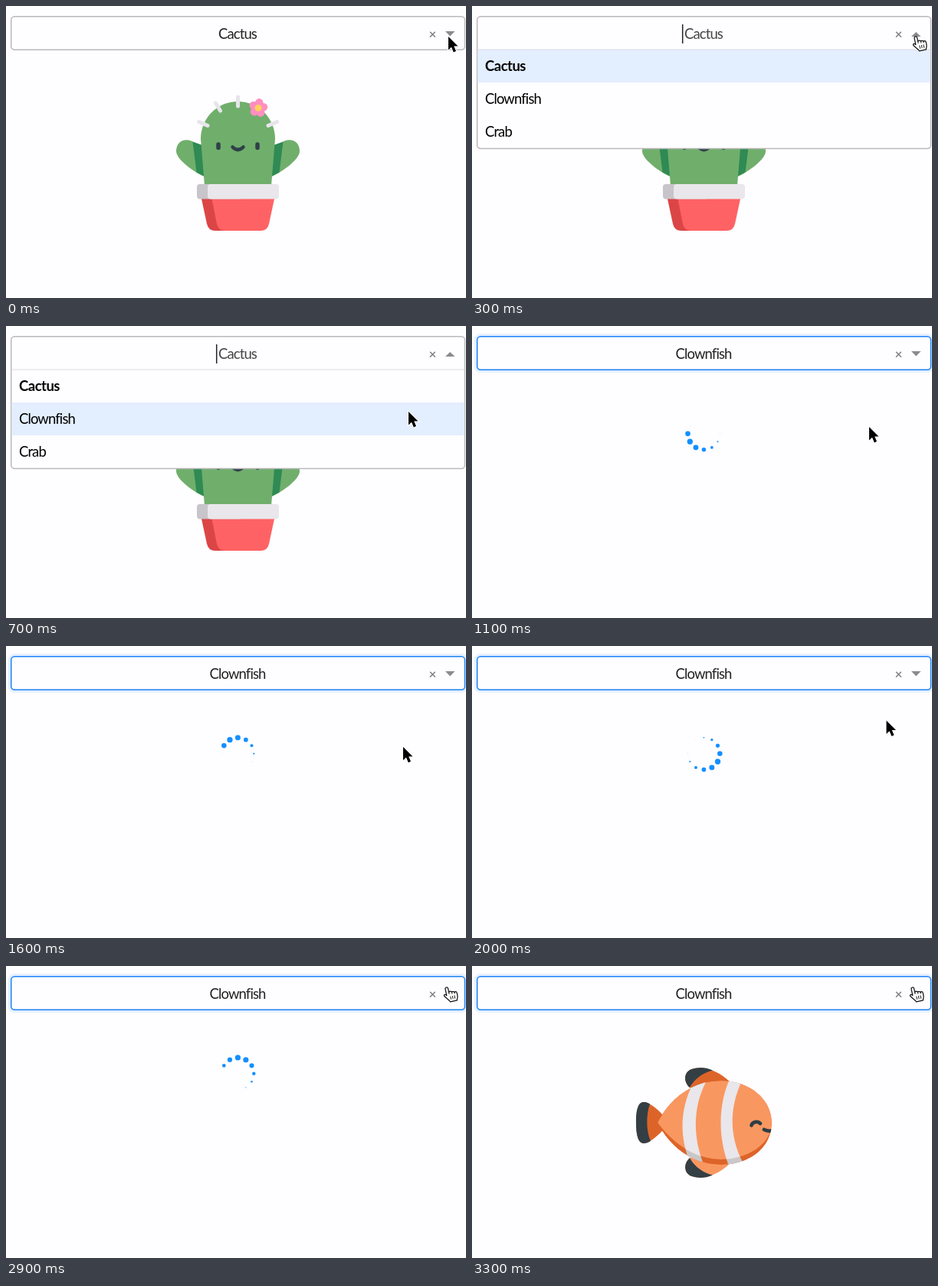
Animation, 600 px wide and 382 px high, one loop 4000 ms. Source, as an HTML page:

```html
<!DOCTYPE html>
<html lang="en">
<head>
<meta charset="utf-8">
<title>Animal picker</title>
<style>
  html, body { margin: 0; width: 100%; height: 100%; overflow: hidden; background: #fefdff; }
  svg { display: block; width: 600px; height: 382px; }
  text { font: 18.5px Lato, "Open Sans", sans-serif; letter-spacing: -.9px; }
  .bold { font-weight: 700; letter-spacing: -.5px; }
  .cross { font-size: 17px; font-weight: 700; letter-spacing: 0; }
  .round { fill: none; stroke-linecap: round; }
</style>
</head>
<body>
<svg viewBox="0 0 600 382">
  <defs>
    <path id="body" d="M242 205C257 174 287 150 325 150C362 150 391 174 391 205C391 238 362 260 325 260C287 260 257 236 242 205Z"/>
    <path id="lit" d="M242 205C257 174 287 150 325 150C362 150 391 174 391 205C391 234 358 253 325 253C291 253 263 233 242 205Z"/>
    <path id="stripes" d="M288 154C271 188 271 222 283 254L304 264C288 227 287 185 306 150ZM337 146C321 180 320 225 336 264L355 260C335 225 335 185 353 148Z"/>
    <path id="fin" d="M284 159C276 152 276 140 285 135.500C298 130 318 134 337 152L310 165Z"/>
    <path id="finTip" d="M284 159C276 152 276 140 285 135.500C294 132 304 132 314 136.500C300 140 290 148 284 159Z"/>
    <g id="arm">
      <path fill="#70ae6c" d="M222 190C222 174 238 172 246 179L258 223C243 216 222 200 222 190Z"/>
      <path fill="#2f8a54" d="M243.500 177.500L256 182L261 224L248.500 217.500Z"/>
    </g>
    <clipPath id="inBody"><use href="#body"/></clipPath>
    <clipPath id="inLit"><use href="#lit"/></clipPath>
  </defs>

  <g id="cactus">
    <use href="#arm"/>
    <use href="#arm" transform="matrix(-1 0 0 1 605 0)"/>
    <path fill="#70ae6c" d="M254 174C254 147 275 125 302.500 125C330 125 351 147 351 174L346 235H259Z"/>
    <path class="round" stroke="#e7e5e9" stroke-width="5" d="M302.500 119V131M273.500 127L279.500 137M251.500 151.500L263 156.500M353.500 151.500L342 156.500"/>
    <g id="flower" fill="#ff8fc0"></g>
    <g class="round" stroke="#2f4048">
      <path stroke-width="5.500" d="M277 181V185.500M328 181V185.500"/>
      <path stroke-width="4.500" d="M295.500 184.500Q302.500 191.500 309.500 184.500"/>
    </g>
    <path fill="#dc4545" d="M254.500 250H300V294H273Q264 294 262 285Z"/>
    <path fill="#ff6264" d="M268 250H350.500L343 285Q341 294 332 294H286Q277 294 275 285Z"/>
    <rect x="249" y="233" width="60" height="19.500" rx="4" fill="#c7c5c9"/>
    <rect x="263" y="233" width="93" height="19.500" rx="4" fill="#e9e7eb"/>
  </g>

  <g id="fish">
    <path fill="#dd6429" d="M248 194C240 185 230 178 224 178C216 178 214 190 214 205C214 222 217 232 224 232C232 231 240 224 249 215Z"/>
    <path fill="#333f44" d="M232 180.500C229 178.500 226 178 224 178C216 178 214 190 214 205C214 222 217 232 224 232C227 232 230 231 233 229C227 216 227 194 232 180.500Z"/>
    <use href="#fin" fill="#dd6429"/>
    <use href="#finTip" fill="#333f44"/>
    <g transform="matrix(1 0 0 -1 0 410)">
      <use href="#fin" fill="#f99760"/>
      <use href="#finTip" fill="#333f44"/>
    </g>
    <g clip-path="url(#inBody)">
      <use href="#body" fill="#dd6429"/>
      <use href="#stripes" fill="#c9c7ca"/>
      <g clip-path="url(#inLit)">
        <use href="#lit" fill="#f99760"/>
        <use href="#stripes" fill="#e9e7eb"/>
      </g>
      <g class="round" stroke="#2f3e44" stroke-width="4.700">
        <path d="M364.500 208.500C366 203 373 203 376 206"/>
        <path d="M381 214Q386 217 393 215"/>
      </g>
    </g>
  </g>

  <g id="spinner" fill="#158fff"></g>

  <rect id="halo" x="4.500" y="11.500" width="596" height="48" rx="6.500" fill="none" stroke="#007eff" stroke-opacity=".1" stroke-width="3"/>
  <rect id="frame" x="6.700" y="13.700" width="591.800" rx="4.500" fill="#fefdff" stroke-width="1.500"/>
  <g id="menu">
    <rect id="hover" x="7.500" width="590" height="43" fill="#e3eeff"/>
    <path stroke="#dcdbde" d="M7.500 57H597.500"/>
    <path stroke="#222" stroke-width="1.500" d="M274.700 24V49"/>
    <text class="bold" x="17" y="85">Cactus</text>
    <text x="17" y="128">Clownfish</text>
    <text x="17" y="171">Crab</text>
  </g>
  <text id="value" x="302" y="42.500" text-anchor="middle"></text>
  <text class="cross" x="556.500" y="42.500" text-anchor="middle" fill="#878689">×</text>
  <path id="caret" fill="#8b8a8d"/>

  <g id="arrow">
    <path d="M0 0V17.500L4 13.800L6.800 20.500L10 19L7.200 12.600H12.500Z" stroke="#fff" stroke-width="2" paint-order="stroke"/>
  </g>
  <g id="hand">
    <g transform="translate(-1.500 0) rotate(-12) scale(.95)" stroke="#111" stroke-width="1.300" stroke-linejoin="round">
      <path fill="#fff" d="M-2 1.500C-2 -.5 1.800 -.5 1.800 1.500V7.500C2.500 6 5.500 6 5.800 8C6.500 6.800 9 7 9.300 9C10 8 12.500 8.200 12.500 10.500V14C12.500 17 11 18 10.500 20.500H1C.5 18.500 -2.500 15.500 -4.500 12.500C-7 9 -4 8 -2 11Z"/>
      <path fill="none" stroke-width="1" d="M1.800 7.500V10M5.800 8V10.500M9.300 9V11M2.800 13V17.500M5.600 13V17.500M8.400 13V17.500"/>
    </g>
  </g>
</svg>
<script>
const $ = id => document.getElementById(id);
const show = (id, on) => { $(id).style.display = on ? '' : 'none'; };
const set = (node, attrs) => { for (const k in attrs) node.setAttribute(k, attrs[k]); };

const LOOP = 4000, STEP = 100;
const OPEN = 200, PICK = 900, DONE = 3300;

// Pointer path: time, x, y
const PATH = [
  [0, 577, 40], [100, 578, 40], [200, 580, 40], [300, 580, 40],
  [400, 567, 104], [500, 545, 175], [600, 531, 150], [700, 525, 112],
  [800, 524, 114], [900, 522, 119], [1100, 518, 132], [1800, 518, 132],
  [1900, 523, 125], [2100, 558, 70], [2200, 570, 48], [2300, 575, 32],
  [2400, 576, 28], [4000, 576, 28]
];

function circle(parent, x, y, r, fill) {
  const c = document.createElementNS('http://www.w3.org/2000/svg', 'circle');
  set(c, { cx: x, cy: y, r });
  if (fill) set(c, { fill });
  return $(parent).appendChild(c);
}

for (let i = 0; i < 5; i++) {
  const a = (i * 72 - 80) * Math.PI / 180;
  circle('flower', 329 + 7 * Math.cos(a), 133.3 + 7 * Math.sin(a), 5.3);
}
circle('flower', 329, 133.3, 6);
circle('flower', 329, 133.3, 4.4, '#ffd25a');

// Dots run clockwise, the first one at 300 degrees
const dots = Array.from({ length: 12 }, (_, i) => {
  const a = (300 + 30 * i - 90) * Math.PI / 180;
  return circle('spinner', 302.4 + 20.9 * Math.cos(a), 140.8 + 20.9 * Math.sin(a), 0);
});

const ease = x => x * x * (3 - 2 * x);

function dotSize(t, i) {
  const p = ((t - 1025 - 80 * i) % 1200 + 2400) % 1200 / 480;
  return p < 1 ? ease(p) : p < 2 ? 1 - ease(p - 1) : 0;
}

function pointer(t) {
  const n = PATH.findIndex(p => p[0] > t);
  const a = PATH[n - 1], b = PATH[n];
  const k = (t - a[0]) / (b[0] - a[0]);
  return [a[1] + (b[1] - a[1]) * k, a[2] + (b[2] - a[2]) * k];
}

function draw(t) {
  const open = t >= OPEN && t < PICK;
  const picked = t >= PICK;
  const spinning = picked && t < DONE;

  show('cactus', !picked);
  show('fish', t >= DONE);
  show('spinner', spinning);
  show('menu', open);
  show('halo', picked);
  if (spinning) dots.forEach((d, i) => set(d, { r: 3.65 * dotSize(t, i) }));

  set($('frame'), { height: open ? 172.8 : 43.6, stroke: picked ? '#1a82f7' : '#b9b8bb' });
  $('value').textContent = picked ? 'Clownfish' : 'Cactus';
  set($('value'), { fill: open ? '#444' : '#222' });
  set($('caret'), { d: open ? 'M573 40H585.5L579.25 34Z' : 'M573 33H585.5L579.25 39.5Z' });

  const [x, y] = pointer(t);
  const row = Math.max(0, Math.min(2, Math.floor((y - 57) / 43)));
  set($('hover'), { y: 57 + 43 * row });

  const hand = (t >= 200 && t <= 300) || t >= 2300;
  show('hand', hand);
  show('arrow', !hand);
  set($(hand ? 'hand' : 'arrow'), { transform: `translate(${x} ${y})` });
}

const start = performance.now();
function tick() {
  const t = (performance.now() - start) % LOOP;
  draw(Math.floor(t / STEP) * STEP);
  requestAnimationFrame(tick);
}
tick();
</script>
</body>
</html>
```
